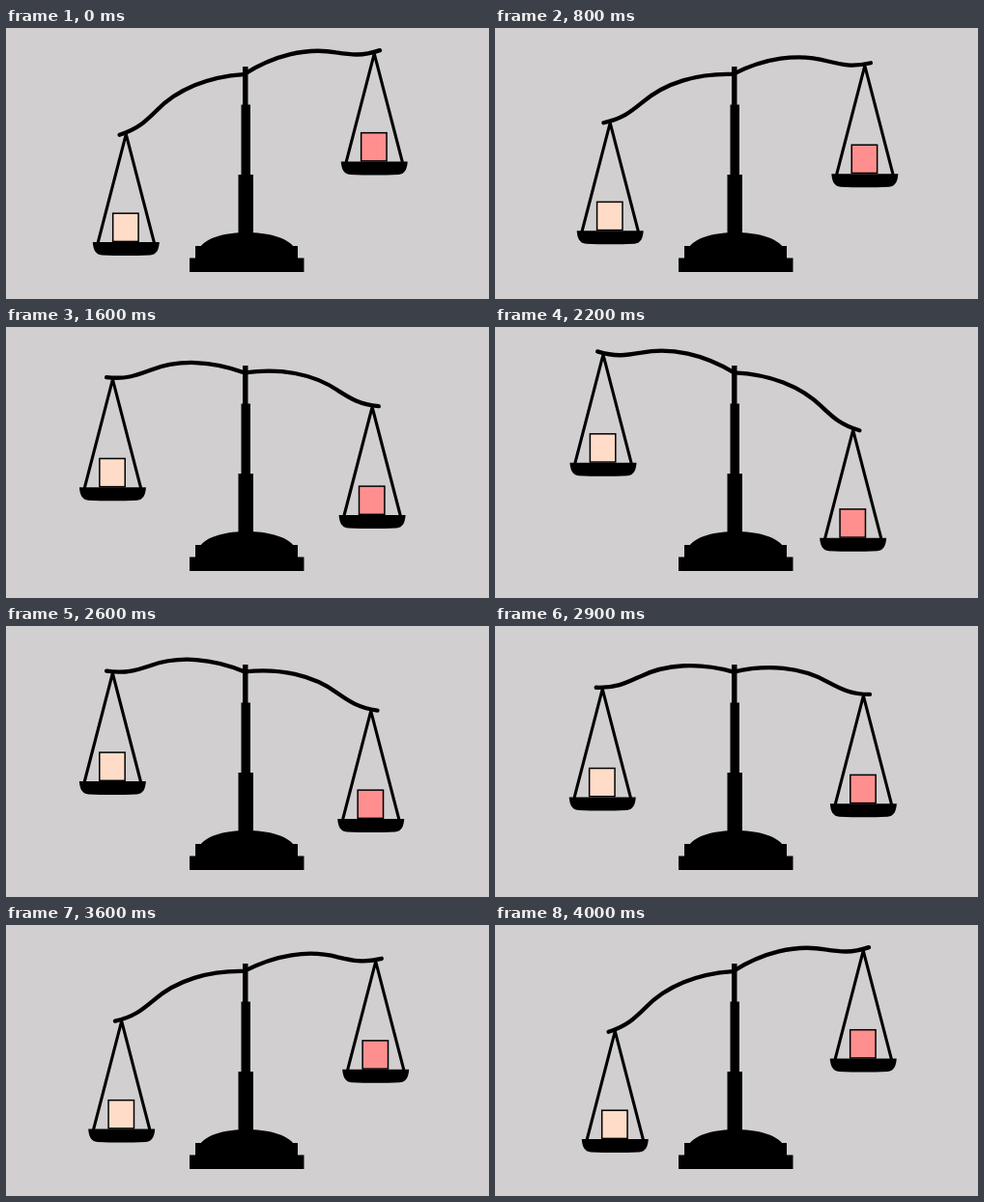
An HTML page for the animation above (4100 ms loop, 500 by 281 pixels).

```html
<!DOCTYPE html>
<html lang="en">
<head>
<meta charset="utf-8">
<title>Balance scale</title>
<style>
  html, body { margin: 0; width: 100%; height: 100%; overflow: hidden; background: #d1cfd0; }
  svg { display: block; width: 100vw; height: 100vh; }
  .line { fill: none; stroke: #000; stroke-linecap: round; stroke-linejoin: round; }
  .box { stroke: #000; stroke-width: 1.5; }
</style>
</head>
<body>
<svg viewBox="0 0 500 281" preserveAspectRatio="none">
  <defs>
    <path id="arm" class="line" stroke-width="4.3" d="M-141.7 17.6C-122 17.8 -112 12.8 -98 5.8C-70 -9.2 -35 -11.2 0 -2.2"/>
    <g id="tray">
      <path class="line" stroke-width="3.1" d="M-29 112L0 0L29 112"/>
      <path d="M-34.5 112H34.5C34 119 32 125 25 125.5Q0 126.5 -25 125.5C-32 125 -34 119 -34.5 112Z"/>
      <rect class="box" x="-13.6" y="82.1" width="26.4" height="29.2"/>
    </g>
  </defs>
  <path d="M245 40h5.5v39.5h2.5v72.5h3v61h-15.5v-61h3v-72.5h1.5z"/>
  <path d="M201 227C215 207 283 207 298 227Z"/>
  <path d="M196 226h106v12.5h6.5v14.5h-118.5v-14.5h6z"/>
  <g id="beam">
    <use href="#arm"/>
    <use href="#arm" transform="scale(-1 1)"/>
  </g>
  <use id="left" href="#tray" fill="#ffdcc8"/>
  <use id="right" href="#tray" fill="#ff8f8f"/>
</svg>
<style>#tray path:last-of-type { fill: #000; }</style>
<script>
const LOOP = 4100, STEP = 100, TURN = 2100, REST = 4000, TILT = 18;
const PIVOT = { x: 248, y: 49.8 }, SHIFT = -1.2, REACH = 135.1, DROP = 19.1;

// Ease with flat ends; x1 and x2 set how long it lingers at each.
function ease(x1, x2) {
  return x => {
    let lo = 0, hi = 1;
    for (let i = 0; i < 24; i++) {
      const s = (lo + hi) / 2, r = 1 - s;
      if (3 * x1 * s * r * r + 3 * x2 * s * s * r + s ** 3 < x) lo = s;
      else hi = s;
    }
    return lo * lo * (3 - 2 * lo);
  };
}

const fall = ease(0.61, 0.83), rise = ease(0.1, 0.78);

function tiltAt(t) {
  const p = t < TURN
    ? fall(t / TURN)
    : 1 - rise(Math.min(1, (t - TURN) / (REST - TURN)));
  return TILT * (2 * p - 1);
}

const [beam, left, right] = ['beam', 'left', 'right'].map(id => document.getElementById(id));

function hang(tray, x, angle) {
  const c = Math.cos(angle), s = Math.sin(angle);
  tray.setAttribute('transform',
    `translate(${PIVOT.x + x * c - DROP * s} ${PIVOT.y + x * s + DROP * c})`);
}

function draw(ms) {
  const tilt = tiltAt(Math.floor(ms % LOOP / STEP) * STEP);
  const angle = tilt * Math.PI / 180;
  beam.setAttribute('transform',
    `translate(${PIVOT.x} ${PIVOT.y}) rotate(${tilt}) translate(${SHIFT} 0)`);
  hang(left, SHIFT - REACH, angle);
  hang(right, SHIFT + REACH, angle);
}

const start = performance.now();
function tick() {
  draw(performance.now() - start);
  requestAnimationFrame(tick);
}
tick();
</script>
</body>
</html>
```
